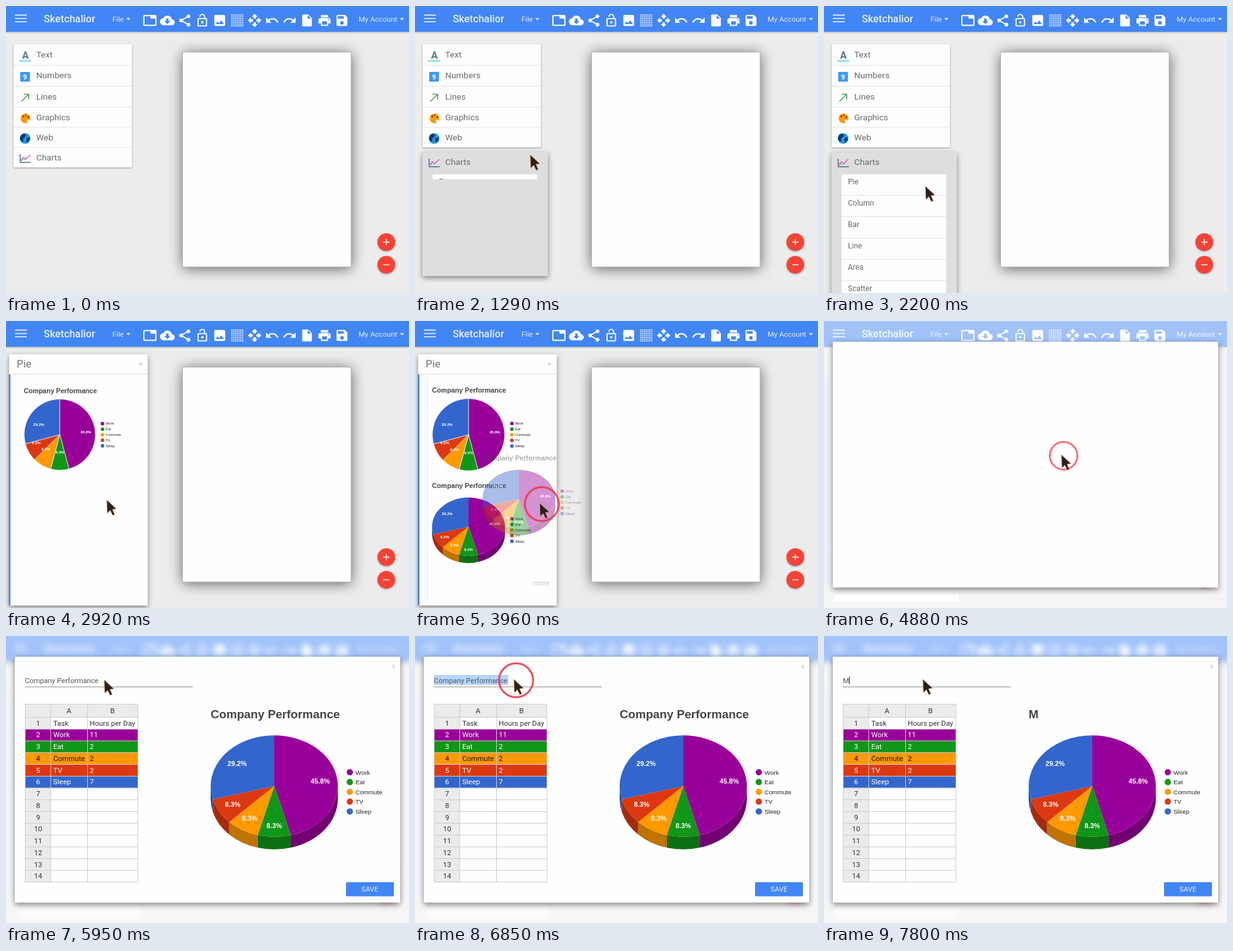
These frames come from a looping animation (640x457 px, 8 s). An HTML page:

```html
<!DOCTYPE html>
<html lang="en">
<head>
<meta charset="utf-8">
<title>Chart editor</title>
<style>
  html, body { margin: 0; width: 100%; height: 100%; overflow: hidden; background: #ececec; }
  svg { display: block; width: 100vw; height: 100vh; }
  text { font-family: Roboto, Arial, sans-serif; }
  .chart text { font-family: "Liberation Sans", Arial, sans-serif; }
  .card { filter: drop-shadow(0 1px 1.5px rgba(0,0,0,.35)); }
  .lift { filter: drop-shadow(0 3px 4px rgba(0,0,0,.45)); }
  .page { filter: drop-shadow(0 2px 11px rgba(0,0,0,.62)); }
</style>
</head>
<body>
<svg id="stage" viewBox="0 0 640 457" preserveAspectRatio="none"></svg>
<script>
const BLUE = '#4285f4';
const LOOP = 8000;

// ---- small builders ----
const rect = (x, y, w, h, fill, more = '') =>
  `<rect x="${x}" y="${y}" width="${w}" height="${h}" fill="${fill}" ${more}/>`;
const circle = (x, y, r, fill, more = '') =>
  `<circle cx="${x}" cy="${y}" r="${r}" fill="${fill}" ${more}/>`;
const path = (d, fill, more = '') => `<path d="${d}" fill="${fill}" ${more}/>`;
const line = (d, color, w = 1) => path(d, 'none', `stroke="${color}" stroke-width="${w}"`);
const text = (x, y, size, fill, s, more = '') =>
  `<text x="${x}" y="${y}" font-size="${size}" fill="${fill}" ${more}>${s}</text>`;
const group = (id, body, more = '') => `<g id="${id}" ${more}>${body}</g>`;
const MID = 'text-anchor="middle"';

// ---- toolbar ----
const dots = () => {
  let d = '';
  for (let i = 0; i < 49; i++) d += `M${i % 7 * 3 - 9.9} ${(i / 7 | 0) * 3 - 9}h1.8`;
  return line(d, '#fff', 1.8);
};
const undo = path('M.5-4c-2.6 0-5 1-6.9 2.6L-10-5v9h9L-4.6.4C-3.2-.8-1.5-1.5.5-1.5c3.5 0 6.5 2.3 7.6 5.5l2.4-.8C9.1-1 5.2-4 .5-4z', '#fff');
const icons = [
  rect(-10, -8, 20, 16, 'none', 'rx="1" stroke="#fff" stroke-width="2"') + rect(1, -8, 9, 5, '#fff'),
  path('M-6 8a6 6 0 0 1-.6-12a7.5 7.5 0 0 1 14 2a5 5 0 0 1-.4 10z', '#fff') +
    path('M5 1L0 6-5 1h3v-4h4v4z', BLUE),
  line('M6-7L-6 0 6 7', '#fff', 2) + circle(6, -7, 3, '#fff') + circle(-6, 0, 3, '#fff') + circle(6, 7, 3, '#fff'),
  rect(-7, -3, 14, 12, 'none', 'rx="1" stroke="#fff" stroke-width="2"') + circle(0, 3, 2, '#fff') +
    line('M-4-6a4 4 0 0 1 8 0v3', '#fff', 1.9),
  rect(-9, -9, 18, 18, '#fff', 'rx="2"') + path('M-7 6L-3.5 1.5-1 4.5 2.5 0 7 6z', BLUE),
  dots(),
  [0, 90, 180, 270].map(a => path('M-2-3h4v-3h3L0-11-5-6h3z', '#fff', `transform="rotate(${a})"`)).join(''),
  undo,
  `<g transform="scale(-1 1)">${undo}</g>`,
  path('M-6-10h8l6 6v12q0 2-2 2h-12q-2 0-2-2v-16q0-2 2-2z', '#fff') + path('M1-8.5V-3h5.5z', BLUE),
  path('M-10 5v-6q0-3 3-3h14q3 0 3 3v6h-4v4h-12v-4z', '#fff') + rect(-6, -9, 12, 4, '#fff') +
    rect(-4, 1.5, 8, 5.5, BLUE) + circle(7, -1, 1, BLUE),
  path('M-9-7q0-2 2-2h12l4 4v12q0 2-2 2h-14q-2 0-2-2z', '#fff') + circle(0, 4, 3, BLUE) + rect(-7, -7, 10, 4, BLUE)
];
const caret = x => path(`M${x} 19.3h6.6l-3.3 3.5z`, '#e8f0fe');
const toolbar = () =>
  rect(-40, -40, 720, 81, BLUE, 'style="filter:drop-shadow(0 1px 1.5px rgba(0,0,0,.3))"') +
  line('M14 14.5h19M14 19.8h19M14 25.1h19', '#dbe7fd', 1.8) +
  text(60, 26.3, 16.2, '#e9f1fe', 'Sketchalior', 'font-weight="500"') +
  text(169, 24.8, 11.5, '#e4edfe', 'File') + caret(191) +
  text(560, 24.8, 11.6, '#e4edfe', 'My Account') + caret(625.5) +
  icons.map((s, i) => `<g transform="translate(${228.5 + i * 27.73} 23) scale(.96)">${s}</g>`).join('');

// ---- left menu ----
const INK = '#6b6b6b';
const label = (y, s) => text(48, y, 13.7, INK, s);
const chartsRow = label(246, 'Charts') +
  line('M22.5 236v13h17', '#546e7a', 1.5) +
  line('M23.5 246l4-5 4 3 7-7', '#ec5f9b', 1.6) + line('M23.5 247l4-3 3 1', '#4dd0e1', 1.2);
const menu = () =>
  rect(12, 61, 188, 196, '#fdfdfd', 'id="menuCard" class="card"') +
  line('M12 94.5h188M12 127.5h188M12 161h188M12 193h188', '#e2e2e2') +
  group('lastRule', line('M12 225h188', '#e2e2e2')) +
  text(31, 83.5, 16, '#607d8b', 'A', MID + ' font-weight="700"') + rect(21, 86, 19, 3, '#8fe3ee') + label(82, 'Text') +
  rect(22.5, 105, 15.5, 15.5, '#3d9bf0', 'rx="1"') +
    text(30.3, 116.5, 10.5, '#fff', '9', MID + ' font-weight="700"') + label(115.3, 'Numbers') +
  line('M24.5 152L36 140.5M28 140.5h8v8', '#4caf50', 1.7) + label(148.8, 'Lines') +
  circle(31, 179, 7.8, '#fb9a0c') + circle(27.5, 176, 1.4, '#6d3b1f') + circle(31.5, 174, 1.4, '#d84315') +
    circle(35.3, 177, 1.4, '#6d3b1f') + circle(35.5, 183.5, 2.4, '#fdfdfd') + label(182, 'Graphics') +
  circle(30.3, 211, 8.4, '#1e96f0') + path('M24 205q5-3 8 0l-2 4-3 2 1 4-3 1-3-5z', '#0d3b63') +
    path('M33 210l4-1 1 4-4 5-2-4z', '#0d3b63') + label(213.8, 'Web');

const kinds = ['Pie', 'Column', 'Bar', 'Line', 'Area', 'Scatter'];
const drawer = () =>
  rect(12, 228, 190, 58, '#dedede', 'id="drawerBox" class="lift"') +
  `<clipPath id="reveal">${rect(28, 268, 166, 0, '#000', 'id="revealBox"')}</clipPath>` +
  `<g clip-path="url(#reveal)">` + rect(28, 268, 166, 204, '#fdfdfd') +
  kinds.map((s, i) => text(38, 284 + i * 34, 12, INK, s) + line(`M28 ${301.5 + i * 34}h166`, '#e2e2e2')).join('') + '</g>';

// ---- pie chart, centred on its top face ----
const TITLE = 'Company Performance';
const slices = [
  ['Work', 11, '#990099', '#730073', 73, -8, '45.8%'],
  ['Eat', 2, '#109618', '#0c7012', 0, 63, '8.3%'],
  ['Commute', 2, '#ff9900', '#bf7300', -39, 51, '8.3%'],
  ['TV', 2, '#dc3912', '#a52b0e', -66, 29, '8.3%'],
  ['Sleep', 7, '#3366cc', '#264d99', -59, -36, '29.2%']
];
function chart(deep, id = '') {
  const k = deep ? .8 : 1, R = deep ? 101 : 100, H = 20, top = deep ? 0 : -9;
  const pt = (h, dy = 0) => {
    const a = h * Math.PI / 12;
    return `${(R * Math.sin(a)).toFixed(2)} ${(dy - R * k * Math.cos(a)).toFixed(2)}`;
  };
  const arc = sweep => `A${R} ${R * k} 0 0 ${sweep} `;
  let side = '', face = '', extra = '', h = 0;
  slices.forEach(([name, hours, color, dark, lx, ly, pct], i) => {
    const end = h + hours, a = Math.max(h, 6), b = Math.min(end, 18);
    if (deep && b > a) side += path(`M${pt(a)}${arc(1)}${pt(b)}L${pt(b, H)}${arc(0)}${pt(a, H)}z`, dark);
    face += path(`M0 0L${pt(h)}${arc(1)}${pt(end)}z`, color, deep ? '' : 'stroke="#fff" stroke-width="1.2"');
    extra += text(lx, ly * .8 / k + 3.7, 10.7, '#fff', pct, MID + ' font-weight="700"');
    const y = top - 22 + i * 15.6;
    extra += circle(120, y, 5, color) + text(129, y + 3.6, 9.9, '#222', name);
    h = end;
  });
  return `<g class="chart">${side}${face}${extra}` +
    text(-101, top - 108, 18.75, '#444', TITLE, `font-weight="700" ${id && `id="${id}"`}`) + '</g>';
}
const place = (x, y, s, body) => `<g transform="translate(${x} ${y}) scale(${s})">${body}</g>`;
const deepSmall = place(85, 327.5, .574, chart(true));

const panel = () =>
  rect(5, 53, 220, 400, '#fefefe', 'class="lift"') +
  text(17, 74.3, 16.6, '#757575', 'Pie') + text(213.7, 71.5, 11, '#bbb', '×', MID) +
  line('M5 84.5h220', '#ddd') + rect(4.5, 85, 2.5, 368, BLUE) +
  group('flat', place(85, 181, .574, chart(false))) + group('deep', deepSmall) +
  text(187.5, 421, 11.4, '#c8c8c8', 'more', 'id="more"');

// ---- dialog ----
function table() {
  const rowH = 18.75, y0 = 129.5;
  const cells = [['Task', 'Hours per Day'], ...slices.map(s => [s[0], s[1]])];
  let out = rect(30.5, 108, 179, 284, '#fefefe') + rect(30.5, 108, 179, 21.5, '#ebebeb') + rect(30.5, 108, 40.5, 284, '#ebebeb');
  let rules = 'M30.5 108.5h179', words = text(100, 122.8, 11.5, '#333', 'A', MID) + text(169, 122.8, 11.5, '#333', 'B', MID);
  for (let i = 0; i < 14; i++) {
    const y = y0 + i * rowH, s = slices[i - 1];
    const ink = !s ? '#333' : s[0] === 'Commute' ? '#111' : '#fff';
    if (s) out += rect(30.5, y, 179, rowH, s[2]);
    rules += `M30.5 ${y}h179`;
    words += text(51, y + 13.2, 11.5, ink, i + 1, MID);
    if (cells[i]) words += text(75, y + 13.2, 11.5, ink, cells[i][0]) + text(133, y + 13.2, 11.5, ink, cells[i][1]);
  }
  return out + line(rules + 'M30.5 392h179M30.5 108v284M71 108v284M129.5 108v284M209.5 108v284', '#ccc') + words;
}
const dialog = () =>
  rect(14, 33, 612, 391.5, '#fefefe', 'style="filter:drop-shadow(0 3px 5px rgba(0,0,0,.5))"') +
  group('form',
    text(615.5, 51.5, 11, '#c4c4c4', 'x', MID) +
    rect(30, 62, 118, 16, '#b4d5fe', 'id="mark"') +
    text(30, 74.5, 11.4, '#555', TITLE, 'id="field"') +
    line('M30 81h267', '#8a8a8a') + line('M40.5 64v13', '#333') .replace('<path', '<path id="bar"') +
    table() + place(426, 239, 1, chart(true, 'head')) +
    rect(540, 392, 76, 22.5, BLUE, 'rx="1.5"') + text(578, 407.4, 11.2, '#e6effe', 'SAVE', MID));

const fab = (y, d) => circle(604, y, 14, '#f44336', 'class="card"') + line(d, '#fff', 1.4);

const stage = document.getElementById('stage');
stage.innerHTML =
  rect(0, 0, 640, 457, '#ececec') +
  group('back',
    group('paper', rect(281, 74, 267, 341.5, '#fefefe', 'class="page"') +
      rect(280.5, 73.5, 267.5, 342, 'none', 'stroke="#b5b5b5"')) +
    toolbar() + group('menu', menu()) + group('drawer', drawer()) + group('charts', chartsRow) +
    group('panel', panel()) + group('rest', rect(16, 436, 198, 10, '#fff') + rect(0, 90, 8, 330, '#d9e6f8')) +
    fab(376, 'M599 376h10M604 371v10') + fab(412, 'M599 412h10')) +
  rect(0, 0, 640, 457, '#fff', 'id="veil" opacity=".5"') +
  group('dialog', dialog()) +
  group('ghost', deepSmall, 'opacity=".42"') +
  circle(0, 0, 27, 'none', 'id="ring" stroke="#ea3b4b" stroke-width="3"') +
  path('M0 0L1 21 5.5 16.5 9.5 24.5 12.5 23 9 15 15 14z', '#2a211d', 'id="cursor" stroke="#d98a4e" stroke-width=".7"');

// ---- step tables: each row holds until the next ----
const cursorSteps = [
  [0, -60, -60], [130, 276, 248], [290, 206, 243], [440, 190, 238], [570, 183, 237],
  [1420, 178, 250], [1550, 168, 272], [1680, 162, 283], [1810, 160, 285],
  [2070, 163, 290], [2200, 161, 287], [2330, 160, 285],
  [3180, 152, 297], [3310, 138, 314], [3440, 122, 329], [3570, 118, 334],
  [3830, 144, 320], [3960, 198, 290], [4120, 289, 247], [4270, 345, 225], [4400, 369, 216], [4530, 377, 213],
  [5360, 330, 188], [5490, 232, 150], [5620, 143, 115], [5800, 154, 73], [5950, 156, 70], [6130, 157, 69]
];
const ringSteps = [
  [0, 0, 0], [3700, 27, .9], [4880, 22, .7], [5010, 0, 0],
  [6130, 27, .9], [6440, 0, 0], [6590, 27, .9], [6720, 22, .7], [6850, 27, .9], [7010, 0, 0]
];
// top, right, bottom, revealed height
const drawerSteps = [
  [0, 226, 200, 257, 0], [1010, 228, 202, 286, 0], [1160, 231, 207, 358, 0], [1290, 233, 211, 430, 8],
  [1420, 233, 211, 475, 70], [1550, 233, 211, 490, 130], [1680, 233, 211, 490, 170], [1810, 233, 211, 490, 204]
];
// scale, opacity after appearing
const popSteps = [[-1e4, .9, 0], [0, .9, .5], [130, .985, 1], [260, 1, 1]];
const moreSteps = [[0, 0], [3310, .3], [3440, .6], [3570, 1]];

const at = (steps, t) => steps.reduce((hit, row) => row[0] <= t ? row : hit).slice(1);
const el = id => document.getElementById(id);
const set = (id, attrs) => { for (const k in attrs) el(id).setAttribute(k, attrs[k]); };
const show = (id, on) => { el(id).style.display = on ? '' : 'none'; };
function pop(id, t, cy) {
  const [s, o] = at(popSteps, t);
  set(id, { opacity: o, transform: `translate(115 ${cy}) scale(${s}) translate(-115 ${-cy})` });
}

function render(t) {
  const open = t >= 1010, side = t >= 2640, modal = t >= 4880, typed = t >= 7800;

  const [top, right, bottom, shown] = at(drawerSteps, t);
  set('menuCard', { height: open ? 164 : 196 });
  set('drawerBox', { y: top, width: right - 12, height: bottom - top });
  set('revealBox', { height: shown });
  set('charts', { transform: `translate(0 ${top - 226})` });
  show('lastRule', !open);
  show('menu', !side);
  show('charts', !side);
  show('drawer', open && !side);

  show('panel', side && !modal);
  pop('flat', t - 2790, 175);
  pop('deep', t - 3050, 325);
  set('more', { opacity: at(moreSteps, t)[0] });

  show('paper', !modal);
  show('rest', modal);
  show('veil', modal);
  show('dialog', modal);
  show('form', t >= 5210);
  el('back').style.filter = t >= 5010 ? 'blur(5px)' : '';
  show('mark', t >= 6590 && !typed);
  show('bar', typed);
  const title = typed ? 'M' : TITLE;
  for (const id of ['field', 'head']) if (el(id).textContent !== title) el(id).textContent = title;

  const [x, y] = at(cursorSteps, t), [r, o] = at(ringSteps, t);
  set('cursor', { transform: `translate(${x} ${y})` });
  set('ring', { cx: x + 3.5, cy: y + 1.5, r, opacity: o });
  show('ghost', t >= 3830 && !modal);
  set('ghost', { transform: `translate(${x - 118} ${y - 334})` });
}

const start = performance.now();
function tick() {
  render((performance.now() - start) % LOOP);
  requestAnimationFrame(tick);
}
tick();
</script>
</body>
</html>
```
